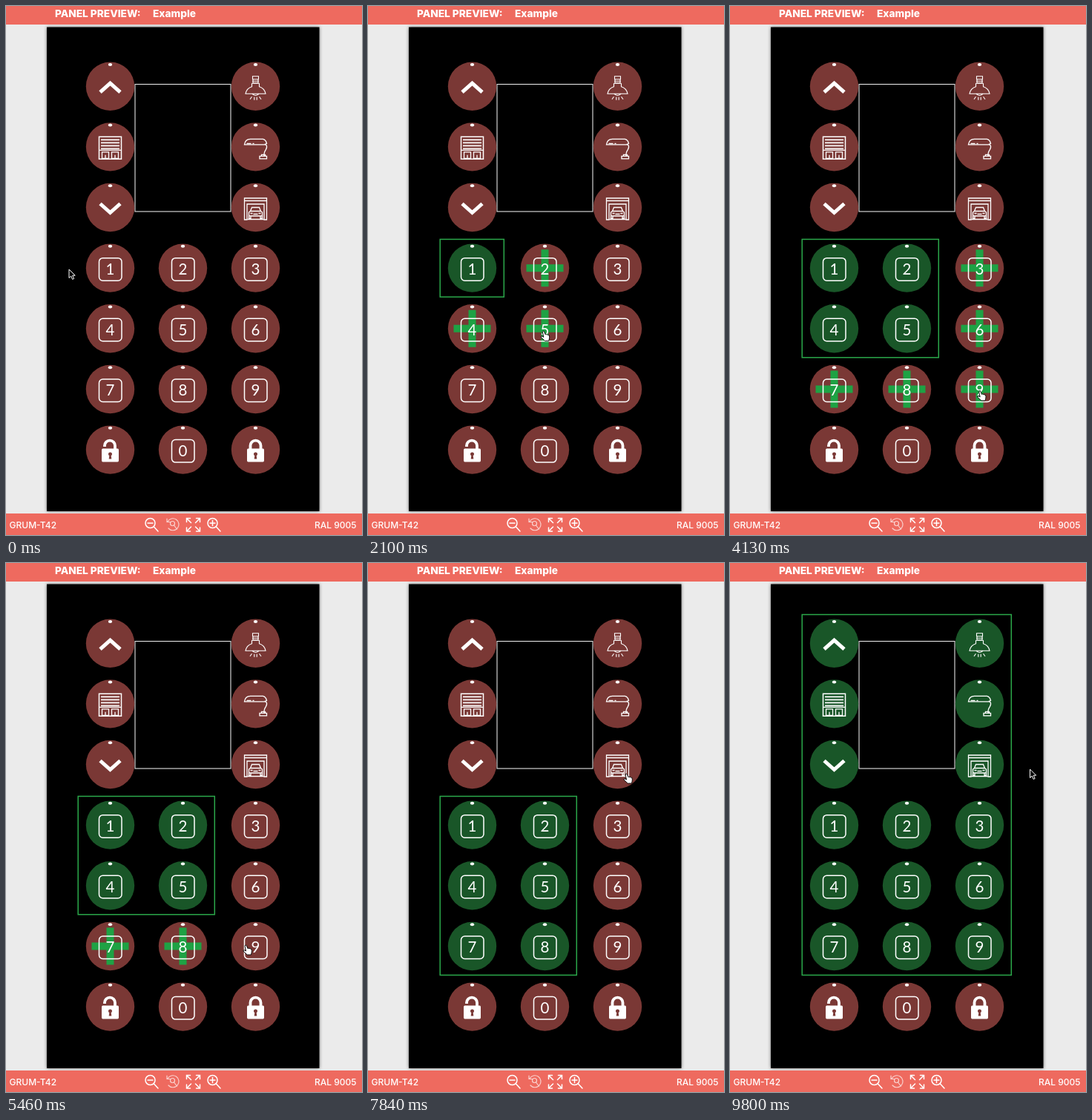
These frames come from a looping animation (480 by 713 pixels, 9870 ms). An HTML page:

```html
<!DOCTYPE html>
<html lang="en">
<head>
<meta charset="utf-8">
<title>Panel preview</title>
<style>
  html, body { margin: 0; width: 100%; height: 100%; overflow: hidden; background: #ebebeb; }
  svg { display: block; width: 480px; height: 713px; }
  .bar { fill: #ee6a5f; }
  .title { font: 800 13.7px Inter, sans-serif; fill: #fff; white-space: pre; }
  .foot { font: 500 12px Inter, sans-serif; fill: #fff; }
  .panel { filter: drop-shadow(0 0 2px rgba(0, 0, 0, .55)); }
  .line { fill: none; stroke: #fff; stroke-width: 1.5; }
  .solid { fill: #fff; }
  .digit { font: 20.5px Lato, sans-serif; fill: #fff; text-anchor: middle; }
  .plus { fill: #0fb647; opacity: .85; }
</style>
</head>
<body>
<svg id="stage" viewBox="0 0 480 713">
  <rect width="480" height="713" fill="#ebebeb"/>
  <rect class="panel" x="55" y="28.5" width="367.5" height="652.5"/>
  <rect class="bar" width="480" height="25"/>
  <rect class="bar" y="684" width="480" height="29"/>
  <text class="title" x="66" y="15">PANEL PREVIEW:</text>
  <text class="title" x="198" y="15">Example</text>
  <text class="foot" x="4.5" y="703.5">GRUM-T42</text>
  <text class="foot" x="472.5" y="703.5" text-anchor="end">RAL 9005</text>

  <g class="line" stroke-linecap="round">
    <g id="zoom"><circle cx="194.5" cy="697" r="6.5"/><path d="M199.5 702l5.5 6M191 697h7"/></g>
    <use href="#zoom" x="84"/>
    <path d="M278.5 693.5v7"/>
    <path d="M243.500 695.500v-5h5m-5 0l6 6M256.500 690.500h5v5m0-5l-6 6M243.500 703v5h5m-5 0l6-6M256.500 708h5v-5m0 5l-6-6"/>
    <g opacity=".7" stroke-width="1.200">
      <path d="M218 695a8 8 0 1 1 1 9M217 691v4.500h4.500"/>
      <circle cx="224.500" cy="697.500" r="3"/><path d="M226.500 700l4 5"/>
    </g>
  </g>
  <rect class="line" x="174" y="105.500" width="129" height="171.500" style="stroke-width:1.100;stroke:#e4e4e4"/>
  <g id="keys"></g>
  <rect id="frame" fill="none" stroke="#2ba84a" stroke-width="1.500"/>
  <g id="cursor" stroke-linejoin="round">
    <path id="arrow" d="M0 0V11.500L2.700 9 4.600 13.400 6.600 12.500 4.700 8.200H8.200Z" fill="#000" stroke="#fff"/>
    <path id="hand" d="M-1 .8Q0-.6 1.300.6L2.800 4.500 4 4 5 4.800 6.300 4.500 7 5.500 8 5.600Q8.800 8 8 10.500L7.500 13H2.200L-3 8.200Q-3.500 6.600-1.500 6.900L.5 8Z" fill="#fff" stroke="#000" stroke-width=".9"/>
  </g>
</svg>
<script>
const LOOP = 9870, STEP = 70, FADE = 400;
const RED = [122, 56, 53], GREEN = [25, 86, 40];
const $ = id => document.getElementById(id);
const colX = c => 140.5 + 98 * c;
const rowY = r => 108.2 + 81.65 * r;

const line = (d, width = 1.5, extra = '') =>
  `<path class="line" style="stroke-width:${width}" d="${d}" ${extra}/>`;
const solid = d => `<path class="solid" fill-rule="evenodd" d="${d}"/>`;

const lockBody = 'M-10-3H10Q11.500-3 11.500-1V13Q11.500 15 10 15H-10Q-11.500 15-11.500 13V-1Q-11.500-3-10-3Z' +
  'M-1.200 6.500L-1.800 11H1.800L1.200 6.500A2.500 2.500 0 1 0-1.200 6.500Z';
const digit = n =>
  '<rect class="line" x="-15" y="-15" width="30.500" height="30.500" rx="5"/>' +
  `<text class="digit" y="7.300">${n}</text>`;

const icons = {
  '0,0': line('M-13.500 6.500L0-5.500 13.500 6.500', 5),
  '0,2': line('M-13.500-6.500L0 5.500 13.500-6.500', 5),
  '0,1': line('M-15-15H15V15H-15Z') +
    line('M-12.500-11H12.500M-12.500-7H12.500M-12.500-3H12.500M-12.500 1H12.500', 1.8) +
    line('M-15 3H15M-11 14V5.500H-2V14ZM2 14V5.500H11V14ZM-6.500 9.500V14M6.500 9.500V14', 1.3),
  '2,0': line('M-4-15H4V-11H-4ZM-4.500-8.500H4.500M-3.500-11V-6H3.500V-11M-5-5.500H5' +
      'M-5-5.500V-1Q-12 1-13.500 8.500H13.500Q12 1 5-1V-5.500M-5 8.500Q0 13 5 8.500' +
      'M-5 12.500L-7.500 16M-1.700 13V17M1.700 13V17M5 12.500L7.500 16', 1.1),
  '2,1': line('M-15-4.500Q-14-12-7-12H10Q14-11 15-6L12-4.500ZM-12-6H-6M-4-6H-2' +
      'M12-5Q17-4 14 2Q11 6 11.500 11M5.500 11H15V14.500H5.500ZM8 11V9H13V11', 1.35),
  '2,2': line('M-15-14H15V15H11.500V-6H-11.500V15H-15ZM-15-10.500H15M-11.500-6H11.500', 1.3) +
    line('M-9 10V5L-7 3.500-5-1.500H5L7 3.500 9 5V10ZM-7 3.500H7M-6.500 10V13H-9V10M6.500 10V13H9V10' +
      'M-7 6.500H-4M4 6.500H7M-3 7.500H3M-11 14.500H11', 1.3),
  '0,6': solid(lockBody) + line('M-7.500-5.500V-7A7 7 0 0 1 6.500-7V-2', 3.8),
  '1,6': digit(0),
  '2,6': solid(lockBody) + line('M-7-2V-7A7 7 0 0 1 7-7V-2', 3.8)
};

const keys = [];
for (let r = 0; r < 7; r++) for (let c = 0; c < 3; c++) {
  if (c === 1 && r < 3) continue;
  const g = document.createElementNS('http://www.w3.org/2000/svg', 'g');
  g.setAttribute('transform', `translate(${colX(c)} ${rowY(r)})`);
  g.innerHTML = '<circle r="32.700"/><ellipse class="solid" cy="-29.300" rx="2.700" ry="2"/>' +
    '<path class="plus" d="M-5-25H5V-5H25V5H5V25H-5V5H-25V-5H-5Z"/>' +
    `<g transform="translate(0 1.500)">${icons[[c, r]] || digit((r - 3) * 3 + c + 1)}</g>`;
  $('keys').append(g);
  keys.push({ c, r, disc: g.firstChild, plus: g.querySelector('.plus') });
}

// Areas are [left, top, right, bottom] in key cells.
const picks = [
  { at: -1000, area: null },
  { at: 1600, area: [0, 3, 0, 3] },
  { at: 2350, area: [0, 3, 1, 4] },
  { at: 6100, area: [0, 3, 2, 5] },
  { at: 7210, area: [0, 3, 1, 5] },
  { at: 9060, area: [0, 0, 2, 5] }
];
const hovers = [
  { from: 1190, to: 1600, area: [0, 3, 0, 3] },
  { from: 2000, to: 2350, area: [0, 3, 1, 4] },
  { from: 2940, to: 3640, area: [0, 3, 2, 4] },
  { from: 3850, to: 4550, area: [0, 3, 2, 5] },
  { from: 4760, to: 5500, area: [0, 3, 1, 5] },
  { from: 5600, to: 6100, area: [0, 3, 2, 5] },
  { from: 7910, to: 8500, area: [0, 2, 2, 5] },
  { from: 8600, to: 9060, area: [0, 0, 2, 5] }
];
const path = [
  [0, 85, 355], [910, 85, 355], [1330, 123, 355], [1600, 130, 358],
  [2000, 236, 438], [2400, 238, 440], [2870, 349, 436], [3500, 345, 440],
  [3850, 338, 518], [4450, 335, 520], [4760, 240, 518], [5250, 245, 517],
  [5460, 323, 515], [6120, 335, 520], [6370, 451.5, 446.5], [6650, 451.5, 446.5],
  [7000, 340, 520], [7300, 340, 520], [7840, 348, 284], [8400, 345, 280],
  [8620, 338, 108], [9100, 338, 110], [9500, 404.5, 278], [9870, 404.5, 278]
];

const inside = (k, a) => !!a && k.c >= a[0] && k.c <= a[2] && k.r >= a[1] && k.r <= a[3];
const show = (el, on) => el.setAttribute('visibility', on ? 'visible' : 'hidden');

function pointer(t) {
  const i = path.findIndex(p => p[0] > t);
  const [t0, x0, y0] = path[i - 1], [t1, x1, y1] = path[i];
  const u = (t - t0) / (t1 - t0), e = u * u * (3 - 2 * u);
  return [x0 + (x1 - x0) * e, y0 + (y1 - y0) * e];
}

function drawKeys(t) {
  const n = picks.filter(p => p.at <= t).length - 1;
  const { at, area } = picks[n];
  const before = n ? picks[n - 1].area : null;
  const mix = Math.min(1, (t - at) / FADE);
  const hover = hovers.find(h => t >= h.from && t < h.to);

  for (const k of keys) {
    const was = +inside(k, before), now = +inside(k, area);
    const level = was + (now - was) * mix;
    const rgb = RED.map((v, i) => Math.round(v + (GREEN[i] - v) * level));
    k.disc.setAttribute('fill', `rgb(${rgb})`);
    show(k.plus, hover && inside(k, hover.area) && !now);
  }

  const box = $('frame');
  show(box, area);
  if (!area) return;
  const x = colX(area[0]) - 43.3, y = rowY(area[1]) - 38.7;
  box.setAttribute('x', x);
  box.setAttribute('y', y);
  box.setAttribute('width', colX(area[2]) + 42.8 - x);
  box.setAttribute('height', rowY(area[3]) + 39 - y);
}

function drawPointer(t) {
  const [x, y] = pointer(t);
  const over = keys.some(k => Math.hypot(x - colX(k.c), y - rowY(k.r)) < 32.7);
  $('cursor').setAttribute('transform', `translate(${x} ${y})`);
  show($('hand'), over);
  show($('arrow'), !over);
}

const start = performance.now();
function tick() {
  const t = Math.floor((performance.now() - start) % LOOP / STEP) * STEP;
  drawKeys(t);
  drawPointer(t);
  requestAnimationFrame(tick);
}
tick();
</script>
</body>
</html>
```
